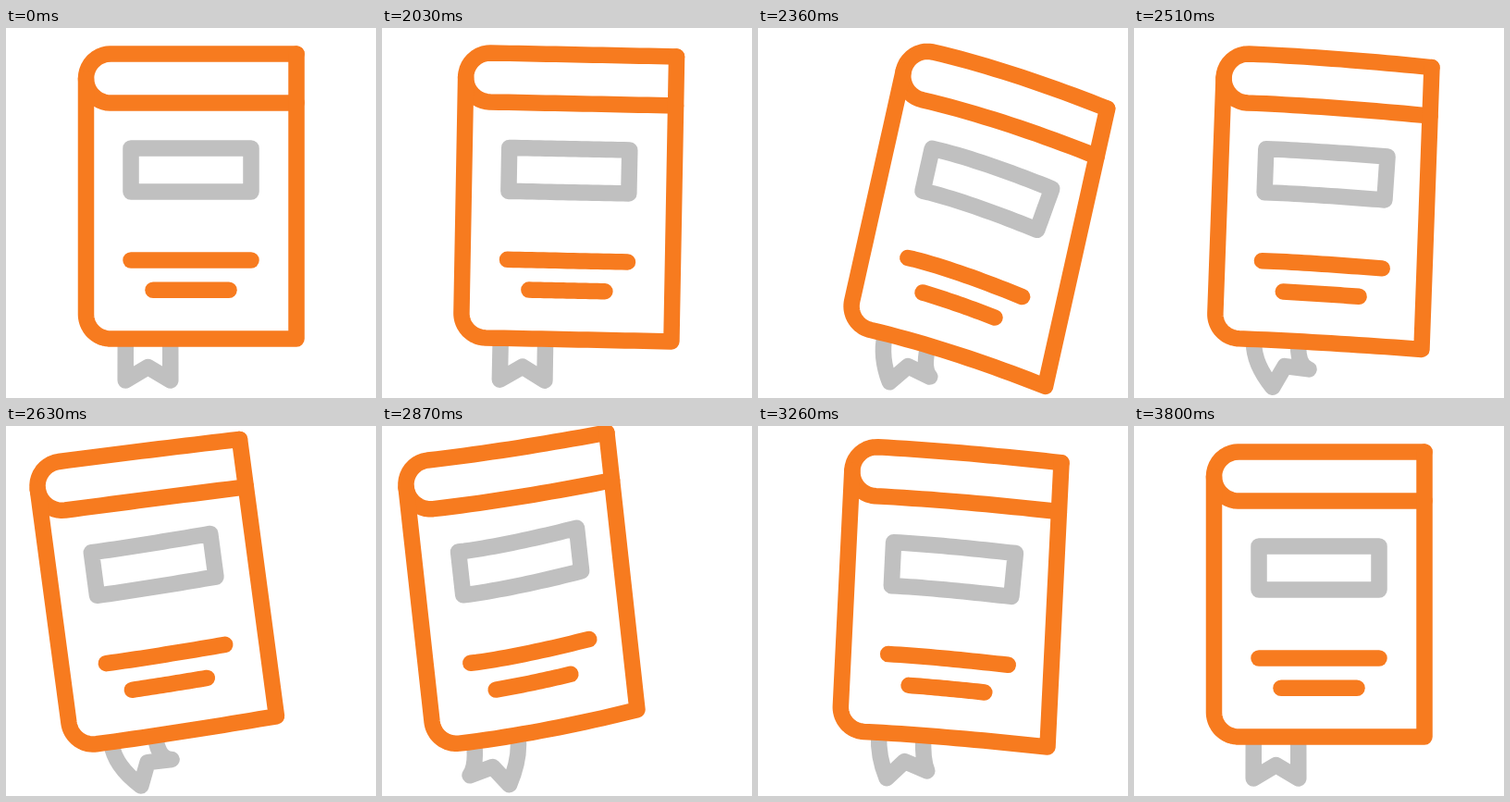
Recreate the animation shown at these times as an HTML page with a canvas. Size 400 px wide and 400 px high, loop 3.83 s.

```html
<!DOCTYPE html>
<html lang="en">
<head>
<meta charset="utf-8">
<title>Swinging book</title>
<style>
  html, body { margin: 0; width: 100%; height: 100%; overflow: hidden; background: #fff; }
  canvas { display: block; width: 400px; height: 400px; }
</style>
</head>
<body>
<canvas id="stage" width="400" height="400"></canvas>
<script>
const ctx = document.getElementById('stage').getContext('2d');
const ORANGE = '#f77b1f', GREY = '#c0c0c0';
const LOOP = 3830, START = 2030, STEP = 30;
const LEFT = 113, TOP = 28, RIGHT = 314, BOTTOM = 336;

// time, tilt in degrees, corner x, corner y, bend at top, bend at bottom, narrowing, ribbon swing
const POSES = [
  [2000, 0, 113, 28, 0, 0, 0, 0],
  [2030, 1.05, 117.6, 27, 0.3, 0.3, 0, 0],
  [2360, 12.6, 189, 26, 18.6, 18.2, 3.5, -20],
  [2420, 14, 196, 25, 19, 19, 4, -22],
  [2540, -2, 99, 30, 4, 0, 3, -30],
  [2630, -7.6, 57, 38.5, 2, -4, 4, -33],
  [2720, -9.3, 40, 40, -6, -11, 5, -8],
  [2870, -6.3, 49.5, 37, -8.5, -15, 5.5, 19.5],
  [3080, -1.5, 98, 30, -4, -6, 2, 8],
  [3260, 2.8, 129.6, 22.8, 7.2, 6.9, 2, -13],
  [3440, 0.8, 118, 27, 1.5, 1.5, 0.5, 2],
  [3620, 0, 113, 28, 0, 0, 0, 0]
];

function slope(i, k) {
  const a = POSES[i - 1], b = POSES[i], c = POSES[i + 1];
  if (!a || !c) return 0;
  const h = b[0] - a[0], g = c[0] - b[0];
  const before = (b[k] - a[k]) / h, after = (c[k] - b[k]) / g;
  // flat at turning points, so nothing overshoots
  if (before * after <= 0) return 0;
  return (before * g + after * h) / (h + g);
}

function poseAt(t) {
  const last = POSES.length - 1;
  if (t < START) return POSES[0];
  if (t >= POSES[last][0]) return POSES[last];
  const i = POSES.findIndex(p => p[0] > t) - 1;
  const a = POSES[i], b = POSES[i + 1], h = b[0] - a[0];
  const u = (t - a[0]) / h, v = 1 - u;
  return a.map((p, k) =>
    v * v * ((1 + 2 * u) * p + u * h * slope(i, k)) +
    u * u * ((3 - 2 * u) * b[k] - v * h * slope(i + 1, k)));
}

function makeBook([, tilt, x0, y0, bendTop, bendBottom, narrow, swing]) {
  const rad = Math.PI / 180;
  const c = Math.cos(tilt * rad), s = Math.sin(tilt * rad);
  const place = (x, y) => [
    x0 + (x - LEFT) * c - (y - TOP) * s,
    y0 + (x - LEFT) * s + (y - TOP) * c
  ];
  const cover = (x, y) => {
    const u = Math.max(0, (x - LEFT) / (RIGHT - LEFT));
    const v = (y - TOP) / (BOTTOM - TOP);
    const bend = bendTop + (bendBottom - bendTop) * v;
    return place(x - narrow * u * u, y + bend * u ** 1.7);
  };
  const label = (x, y) => {
    const u = Math.max(0, (x - 140) / 125);
    const bend = 0.775 * bendBottom;
    const lean = Math.max(0, 177 - y) * Math.max(0, bend) * 0.009 * Math.sqrt(u);
    return place(x + lean, y + bend * u ** 1.5);
  };
  const [px, py] = place(153.5, 345);
  const a = (tilt + swing) * rad, rc = Math.cos(a), rs = Math.sin(a);
  const squeeze = 1 - 0.1 * Math.min(1, Math.abs(swing) / 15);
  const ribbon = (x, y) => {
    x *= squeeze;
    return [px + x * rc - y * rs, py + x * rs + y * rc];
  };
  return { cover, label, ribbon };
}

// points along straight edges, closely spaced so that they can bend
function edges(points) {
  const out = [points[0]];
  for (let i = 1; i < points.length; i++) {
    const [ax, ay] = points[i - 1], [bx, by] = points[i];
    for (let k = 1; k <= 20; k++) out.push([ax + (bx - ax) * k / 20, ay + (by - ay) * k / 20]);
  }
  return out;
}

function arc(cx, cy, r, from, to) {
  return Array.from({ length: 21 }, (_, k) => {
    const a = (from + (to - from) * k / 20) * Math.PI;
    return [cx + r * Math.cos(a), cy + r * Math.sin(a)];
  });
}

const HEAD = [
  ...edges([[RIGHT, TOP], [LEFT, TOP]]),
  ...arc(LEFT, 54.5, 26.5, 1.5, 0.5),
  ...edges([[LEFT, 81], [RIGHT, 81]])
];
const BODY = [
  ...edges([[86.5, 54.5], [86.5, 309.5]]),
  ...arc(LEFT, 309.5, 26.5, 1, 0.5),
  ...edges([[LEFT, BOTTOM], [RIGHT, BOTTOM], [RIGHT, TOP]])
];
const PLATE = edges([[135, 130], [265, 130], [265, 177], [135, 177], [135, 130]]);
const LINES = [edges([[135, 251], [265, 251]]), edges([[159, 283.3], [241, 283.3]])];

function stroke(points, map, color, closed) {
  ctx.strokeStyle = color;
  ctx.beginPath();
  points.forEach(p => ctx.lineTo(...map(...p)));
  if (closed) ctx.closePath();
  ctx.stroke();
}

function drawRibbon({ cover, ribbon }) {
  ctx.strokeStyle = GREY;
  ctx.beginPath();
  ctx.moveTo(...cover(129.3, 338));
  ctx.quadraticCurveTo(...cover(129.3, 362), ...ribbon(-24.3, 36));
  ctx.lineTo(...ribbon(0, 21.5));
  ctx.lineTo(...ribbon(24.3, 36));
  ctx.quadraticCurveTo(...cover(177.7, 362), ...cover(177.7, 338));
  ctx.stroke();
}

function draw(t) {
  ctx.fillStyle = '#fff';
  ctx.fillRect(0, 0, 400, 400);
  ctx.lineWidth = 17.5;
  ctx.lineCap = ctx.lineJoin = 'round';
  const time = t < START ? 0 : START + Math.floor((t - START) / STEP) * STEP;
  const book = makeBook(poseAt(time));
  drawRibbon(book);
  stroke(PLATE, book.label, GREY, true);
  stroke(HEAD, book.cover, ORANGE);
  stroke(BODY, book.cover, ORANGE);
  LINES.forEach(line => stroke(line, book.label, ORANGE));
}

const begin = performance.now();
function tick() {
  draw((performance.now() - begin) % LOOP);
  requestAnimationFrame(tick);
}
tick();
</script>
</body>
</html>
```
